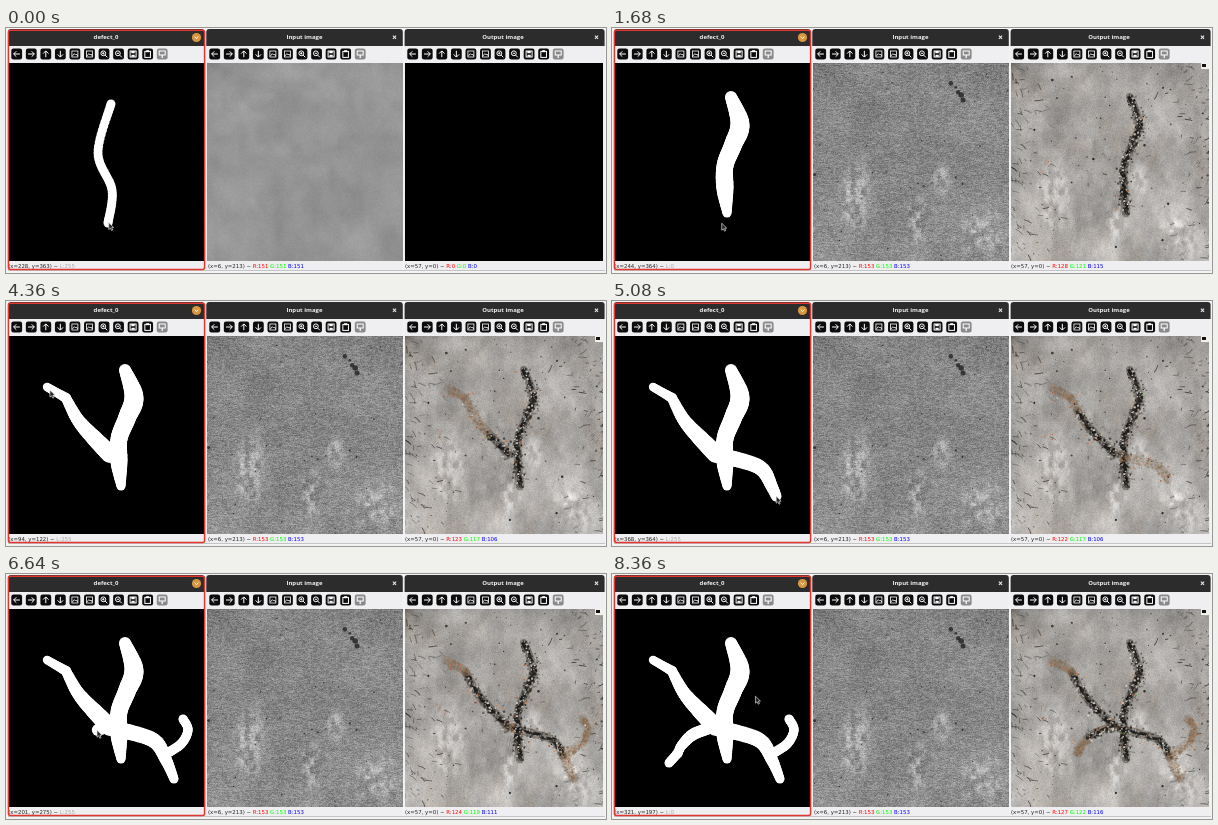
Recreate the animation shown at these times as an HTML page with a canvas. Size 600 by 245 pixels, loop 8.64 s.

```html
<!DOCTYPE html>
<html lang="en">
<head>
<meta charset="utf-8">
<title>Defect painting</title>
<style>
html, body { margin: 0; width: 100%; height: 100%; overflow: hidden; background: #f4f4f4; }
canvas { display: block; width: 600px; height: 245px; }
</style>
</head>
<body>
<canvas id="stage" width="600" height="245"></canvas>
<script>
const LOOP = 8640, SIZE = 198, TOP = 35, SCALE = 0.4375;
const SWITCH = 480, SETTLED = 8080, TAU = Math.PI * 2;
const ctx = document.getElementById('stage').getContext('2d');
const clamp = (v, a = 0, b = 1) => Math.max(a, Math.min(b, v));
const ramp = (t, a, b) => clamp((t - a) / (b - a));

function rng(seed) {
  return () => {
    seed = (seed + 0x6d2b79f5) | 0;
    let v = Math.imul(seed ^ (seed >>> 15), 1 | seed);
    v = (v + Math.imul(v ^ (v >>> 7), 61 | v)) ^ v;
    return ((v ^ (v >>> 14)) >>> 0) / 4294967296;
  };
}

function layer(w, h) {
  const c = document.createElement('canvas');
  c.width = w;
  c.height = h;
  return c;
}

// piecewise linear value of [time, a, b...] rows
function track(rows, t) {
  let i = 0;
  while (i < rows.length - 2 && rows[i + 1][0] <= t) i++;
  const a = rows[i], b = rows[i + 1], k = ramp(t, a[0], b[0]);
  return a.slice(1).map((v, j) => v + (b[j + 1] - v) * k);
}

// Catmull-Rom curve through [x, y, radius] points
function curve(p, per = 14) {
  const out = [], at = i => p[clamp(i, 0, p.length - 1)];
  for (let i = 0; i < p.length - 1; i++) {
    const [a, b, c, d] = [at(i - 1), at(i), at(i + 1), at(i + 2)];
    for (let s = 0; s < per; s++) {
      const u = s / per;
      out.push(b.map((v, k) => v + 0.5 * u * (c[k] - a[k] +
        u * (2 * a[k] - 5 * v + 4 * c[k] - d[k] + u * (3 * (v - c[k]) + d[k] - a[k])))));
    }
  }
  out.push(p[p.length - 1]);
  return out;
}

function disc(g, x, y, r) {
  g.beginPath();
  g.arc(x, y, r, 0, TAU);
  g.fill();
}

// ---- brush strokes and pointer ----
const trial = curve([[105, 76, 4.5], [92, 125, 4.5], [106, 162, 4.5], [102, 195, 4.5]]);
const trunk = curve([[119, 69, 6], [128, 96, 9.5], [121, 117, 9], [113, 138, 8.5], [113, 161, 8.5], [115, 185, 4.5]]);
const leftArm = curve([[104, 153, 9], [88, 137, 8], [72, 119, 6.5], [60, 97, 5]]);
const leftTip = curve([[60, 97, 5], [41, 86, 4.2]]);
const rightLeg = curve([[110, 155, 8], [147, 166, 7.5], [160, 186, 6], [168, 205, 4.5]]);
const hook = curve([[158, 181, 5], [175, 170, 4.8], [182, 156, 4.6], [177, 145, 4.5]]);
const leftLeg = curve([[104, 152, 6], [82, 160, 6], [70, 171, 5], [66, 179, 4.5]]);
const foot = curve([[66, 179, 4.8], [57, 189, 4.5]]);

// settle: share of the crack that turns dark; lag: how late it follows the brush
const stroke = (t0, t1, pts, { wide = 1, settle, lag = 1000 } = {}) => ({ t0, t1, pts, wide, settle, lag });
const firstStroke = stroke(-1, 0, trial);
const strokes = [
  stroke(980, 1500, trunk, { settle: 1, lag: 150 }),
  stroke(2440, 3240, leftArm, { wide: 0.75, settle: 0.95, lag: 2200 }),
  stroke(3480, 3900, leftArm),
  stroke(3940, 4280, leftTip, { settle: 0 }),
  stroke(4660, 5180, rightLeg, { settle: 0.62, lag: 1500 }),
  stroke(5420, 5820, hook, { settle: 0 }),
  stroke(6500, 7200, leftLeg, { settle: 0.5 }),
  stroke(7460, 7800, foot)
];

// where the pointer rests, in image pixels
const pointer = [
  [0, 228, 363], [920, 285, -62], [1680, 244, 364], [3440, 161, 190], [4360, 93, 121],
  [5880, 392, 248], [7360, 167, 295], [8160, 408, 115], [8360, 321, 197]
].map(([t, x, y]) => [t, 3 + x * SCALE, 36 + y * SCALE]);
for (const s of strokes) {
  s.pts.forEach(([x, y], i) => pointer.push([s.t0 + (s.t1 - s.t0) * i / (s.pts.length - 1), x, y]));
}
pointer.sort((a, b) => a[0] - b[0]);

const mask = layer(200, 245);
const mg = mask.getContext('2d', { willReadFrequently: true });

function drawMask(t) {
  mg.fillStyle = '#000';
  mg.fillRect(0, 0, 200, 245);
  mg.fillStyle = '#fff';
  for (const s of t < SWITCH ? [firstStroke] : strokes) {
    if (t <= s.t0) continue;
    const n = ramp(t, s.t0, s.t1) * (s.pts.length - 1);
    for (let i = 0; i <= n; i++) disc(mg, s.pts[i][0], s.pts[i][1], s.pts[i][2] * s.wide);
  }
}

// ---- concrete textures ----
function valueNoise(seed) {
  const r = rng(seed), grid = Array.from({ length: 4096 }, r);
  const at = (x, y) => grid[(x & 63) + ((y & 63) << 6)];
  const ease = u => u * u * (3 - 2 * u);
  return (x, y) => {
    const i = Math.floor(x), j = Math.floor(y), u = ease(x - i), v = ease(y - j);
    const a = at(i, j) + (at(i + 1, j) - at(i, j)) * u;
    const b = at(i, j + 1) + (at(i + 1, j + 1) - at(i, j + 1)) * u;
    return a + (b - a) * v - 0.5;
  };
}
const noise = valueNoise(7);
const fbm = (x, y) => noise(x, y) + noise(x * 2.1, y * 2.1) * 0.5 + noise(x * 4.3, y * 4.3) * 0.3;

function texture(seed, shade) {
  const c = layer(SIZE, SIZE), g = c.getContext('2d'), img = g.createImageData(SIZE, SIZE), r = rng(seed);
  for (let y = 0, i = 0; y < SIZE; y++) {
    for (let x = 0; x < SIZE; x++, i += 4) {
      const [v, warm] = shade(x, y, r);
      img.data.set([v + warm, v, v - warm, 255], i);
    }
  }
  g.putImageData(img, 0, 0);
  return c;
}

// pale worn spots: centre and radii
const worn = [[42, 135, 22, 48], [128, 115, 11, 20], [104, 155, 14, 34], [168, 172, 30, 34]];
function wear(x, y) {
  const near = Math.max(...worn.map(([a, b, p, q]) => 1 - Math.hypot((x - a) / p, (y - b) / q)));
  return clamp(near * 1.6) * clamp(0.5 + fbm(x / 5, y / 8) * 1.8);
}

function dots(g, seed, n) {
  const r = rng(seed);
  for (let i = 0; i < n; i++) {
    g.fillStyle = `rgba(25,25,25,${0.4 + r() * 0.5})`;
    disc(g, r() * SIZE, r() * SIZE, 0.4 + r() * r() * 1.2);
  }
}

const plain = texture(3, (x, y, r) =>
  [149 + fbm(x / 38, y / 45) * 16 + fbm(x / 9, y / 11) * 6 + (r() - 0.5) * 7, 0]);

const rough = texture(5, (x, y, r) => {
  const grain = noise(x / 2.6, y * 1.1) * 36 + (r() - 0.5) * 34;
  return [130 + y * 0.05 + fbm(x / 26, y / 50) * 18 + grain + wear(x, y) * 46, 0];
});
{
  const g = rough.getContext('2d'), r = rng(12);
  dots(g, 11, 80);
  g.fillStyle = 'rgba(40,40,40,.85)';
  for (let i = 0; i < 5; i++) disc(g, 137 + i * 3 + r() * 3, 20 + i * 4 + r() * 2, 1.3 + r() * 1.6);
}

const wall = texture(8, (x, y, r) => {
  const rust = clamp(fbm(x / 24 + 9, y / 28) - 0.1) * 9;
  return [154 + y * 0.1 + fbm(x / 24, y / 48) * 40 + fbm(x / 6, y / 8) * 16 + (r() - 0.5) * 18 +
    wear(x, y) * 42, 2.5 + rust];
});
{
  const g = wall.getContext('2d'), r = rng(31);
  dots(g, 23, 100);
  // dark fibres, mostly along both sides
  for (let i = 0; i < 150; i++) {
    const edge = r() * r() * 45, pick = r();
    const x = pick < 0.42 ? edge : pick < 0.85 ? SIZE - edge : r() * SIZE, y = r() * SIZE;
    const a = (x < SIZE / 2 ? 0.6 : -0.5) + (r() - 0.5) * 1.8, l = 2 + r() * 7;
    g.strokeStyle = `rgba(25,22,20,${0.3 + r() * 0.45})`;
    g.lineWidth = 0.5 + r() * 0.6;
    g.beginPath();
    g.moveTo(x, y);
    g.quadraticCurveTo(x + Math.cos(a) * l * 0.6, y + Math.sin(a) * l * 0.3, x + Math.cos(a) * l, y + Math.sin(a) * l);
    g.stroke();
  }
  // grey smear below the trunk
  for (let i = 0; i < 40; i++) {
    const x = 103 + r() * 14, y = 124 + r() * 12;
    g.strokeStyle = `rgba(60,57,54,${0.1 + r() * 0.2})`;
    g.beginPath();
    g.moveTo(x, y);
    g.lineTo(x - 3, y + 10 + r() * 10);
    g.stroke();
  }
  g.fillStyle = '#f2f2ec';
  g.fillRect(190, 0, 8, 6);
  g.fillStyle = '#111';
  g.fillRect(191, 1, 4, 3);
}

// ---- cracks follow the brush strokes ----
function crack(s, k) {
  const r = rng(41 + k), bits = [], n = s.pts.length * 6;
  const pts = s.pts.map(([x, y, w]) => [x + 399, y, w]);
  for (let i = 0; i < n; i++) {
    const u = i / n, [x, y, w] = pts[Math.floor(u * pts.length)];
    const spread = () => (r() + r() - 1) * w;
    bits.push({ u, x: x + spread(), y: y + spread(), s: 0.7 + r() * 1.5, kind: r(), tone: r() });
  }
  const line = pts.map(([x, y, w]) => [x + (r() - 0.5) * w * 0.5, y + (r() - 0.5) * w * 0.4]);
  return { ...s, pts, line, bits };
}
const cracks = strokes.filter(s => s.settle !== undefined).map(crack);
const stainAt = (c, t) => ramp(t, c.t0 + 100, c.t1 + 160);
const darkAt = (c, t) => c.settle * ramp(t, c.t0 + c.lag / 2, c.t1 + c.lag);

function trail(pts, part, color, width) {
  if (part <= 0) return;
  ctx.strokeStyle = color;
  ctx.lineWidth = width;
  ctx.beginPath();
  pts.slice(0, Math.ceil(part * pts.length)).forEach(p => ctx.lineTo(p[0], p[1]));
  ctx.stroke();
}

function drawCrack(c, t) {
  const stain = stainAt(c, t), dark = darkAt(c, t);
  trail(c.pts, stain, 'rgba(115,90,65,.2)', 9);
  trail(c.pts, dark, 'rgba(40,37,35,.3)', 8);
  trail(c.line, dark, 'rgba(15,15,15,.8)', 2.8);
  for (const b of c.bits) {
    if (b.u > stain) break;
    const v = b.tone * 50 | 0;
    if (b.u > dark || b.kind > 0.9) ctx.fillStyle = `rgba(${115 + v},${86 + v},${58 + v},.45)`;
    else if (b.kind < 0.4) ctx.fillStyle = `rgba(20,20,20,${0.4 + b.tone * 0.5})`;
    else if (b.kind < 0.6) ctx.fillStyle = `rgb(${160 + v},${158 + v},${152 + v})`;
    else ctx.fillStyle = 'rgba(70,66,62,.5)';
    ctx.fillRect(b.x, b.y, b.s, b.s);
  }
}

// stray coloured pixels, renewed at every generation step
function drawStray(t) {
  const r = rng(900 + Math.floor(t / 240));
  const hues = ['#d0713a', '#b0502a', '#c08a58', '#e8e4dc', '#5f9a4a', '#222'];
  for (const c of cracks) {
    const stain = stainAt(c, t);
    for (let i = 0; i < stain * 12; i++) {
      const p = c.pts[Math.floor(r() * stain * (c.pts.length - 1))];
      ctx.fillStyle = hues[Math.floor(r() * r() * hues.length)];
      const s = 0.7 + r() * 0.9;
      ctx.fillRect(p[0] + (r() - 0.5) * 22, p[1] + (r() - 0.5) * 16, s, s);
    }
  }
  for (let i = 0; i < 9; i++) {
    ctx.fillStyle = hues[i % 3];
    ctx.fillRect(428 + r() * 12, 128 + r() * 18, 1, 1);
  }
}

function drawOutput(t) {
  ctx.save();
  ctx.beginPath();
  ctx.rect(399, TOP, SIZE, SIZE);
  ctx.clip();
  ctx.lineCap = ctx.lineJoin = 'round';
  if (t < SWITCH) {
    ctx.fillStyle = '#000';
    ctx.fillRect(399, TOP, SIZE, SIZE);
  } else {
    const hold = Math.min(t, SETTLED);
    ctx.drawImage(wall, 399, TOP);
    cracks.forEach(c => drawCrack(c, hold));
    drawStray(hold);
  }
  ctx.restore();
}

// ---- window chrome ----
function lines(g, ...paths) {
  g.beginPath();
  for (const p of paths) p.forEach(([x, y], i) => i ? g.lineTo(x, y) : g.moveTo(x, y));
  g.stroke();
}

function icon(g, i, cx, cy) {
  g.save();
  g.translate(cx, cy);
  g.fillStyle = i === 10 ? '#8a8a8a' : '#0c0c0c';
  g.beginPath();
  g.roundRect(-5.4, -5.4, 10.8, 10.8, 2.2);
  g.fill();
  g.strokeStyle = g.fillStyle = '#fff';
  g.lineWidth = 1;
  if (i < 4) {
    g.rotate([Math.PI, 0, -Math.PI / 2, Math.PI / 2][i]);
    lines(g, [[-3.2, 0], [3, 0]], [[0.4, -2.7], [3.1, 0], [0.4, 2.7]]);
  } else if (i < 6) {
    g.lineWidth = 0.8;
    g.strokeRect(-3, -3, 6, 6);
    lines(g, [[-2.5, 2], [-0.6, -0.4], [0.7, 1], [1.6, 0], [2.8, 2]]);
  } else if (i < 8) {
    g.beginPath();
    g.arc(-0.7, -0.7, 2.4, 0, TAU);
    g.stroke();
    lines(g, [[1.1, 1.1], [3.3, 3.3]], [[-1.8, -0.7], [0.4, -0.7]]);
    if (i === 6) lines(g, [[-0.7, -1.8], [-0.7, 0.4]]);
  } else if (i === 8) {
    g.strokeRect(-3, -3, 6, 6);
    g.fillRect(-1.8, -3, 3.4, 2.2);
    g.fillRect(-1.6, 0.8, 3.2, 2);
  } else if (i === 9) {
    g.strokeRect(-2.8, -2.6, 5.6, 6);
    g.fillRect(-1.5, -3.8, 3, 2);
  } else {
    g.strokeRect(-3, -3, 6, 4);
    g.fillRect(-0.6, 1, 1.2, 3);
  }
  g.restore();
}

const chrome = layer(600, 245);
{
  const g = chrome.getContext('2d');
  g.fillStyle = '#f4f4f4';
  g.fillRect(0, 0, 600, 245);
  g.fillStyle = '#c4c4c4';
  g.fillRect(2, 242, 597, 1);
  ['defect_0', 'Input image', 'Output image'].forEach((name, k) => {
    const x = 2 + k * 198.3, w = k < 2 ? 196.5 : 200;
    g.fillStyle = '#efeef0';
    g.fillRect(x, 18, w, 224);
    g.fillStyle = '#2c2c2c';
    g.beginPath();
    g.roundRect(x, 1, w, 17, [3, 3, 0, 0]);
    g.fill();
    g.fillStyle = '#f2f2f2';
    g.font = '700 6px "Open Sans", "Noto Sans", sans-serif';
    g.textAlign = 'center';
    g.fillText(name, 100 + k * 198.5, 11.4);
    for (let i = 0; i < 11; i++) icon(g, i, 10.7 + k * 198 + i * 14.55, 26);
    g.strokeStyle = '#e8e8e8';
    g.lineWidth = 1.1;
    const cx = k === 1 ? 388.5 : 590.5;
    if (k) lines(g, [[cx - 1.6, 7.6], [cx + 1.6, 10.8]], [[cx + 1.6, 7.6], [cx - 1.6, 10.8]]);
  });
  g.fillStyle = '#d9963f';
  disc(g, 190.5, 9.5, 4.6);
  g.strokeStyle = '#fff';
  g.lineWidth = 0.9;
  lines(g, [[188.7, 8.6], [190.5, 10.6], [192.3, 8.6]]);
}

function status(x, parts) {
  ctx.font = '5.4px "DejaVu Sans", sans-serif';
  for (const [text, color] of parts) {
    ctx.fillStyle = color;
    ctx.fillText(text, x, 239.9);
    x += ctx.measureText(text).width;
  }
}
const rgbParts = (pos, [r, g, b]) =>
  [[pos + ' ~ ', '#222'], [`R:${r} `, '#f00'], [`G:${g} `, '#0f0'], [`B:${b}`, '#00f']];

function drawPointer(x, y) {
  ctx.beginPath();
  [[0, 0], [0, 7], [1.6, 5.6], [2.8, 8], [4, 7.4], [2.9, 5.1], [5, 4.9]].forEach(p => ctx.lineTo(x + p[0], y + p[1]));
  ctx.closePath();
  ctx.fillStyle = '#222';
  ctx.fill();
  ctx.strokeStyle = '#ddd';
  ctx.lineWidth = 0.7;
  ctx.stroke();
}

const readings = [[1680, 128, 121, 115], [3440, 125, 118, 106], [5880, 121, 116, 106],
  [7360, 127, 121, 115], [SETTLED, 127, 122, 116]];

function draw(t) {
  const early = t < SWITCH;
  const [px, py] = track(pointer, t);
  drawMask(t);
  ctx.drawImage(chrome, 0, 0);
  ctx.drawImage(mask, 3, TOP, 195, SIZE, 3, TOP, 195, SIZE);
  ctx.drawImage(early ? plain : rough, 0, 0, 196, SIZE, 201, TOP, 196, SIZE);
  drawOutput(t);
  const level = mg.getImageData(Math.round(px), Math.round(py), 1, 1).data[0] > 127 ? 255 : 0;
  const ix = Math.round((px - 3) / SCALE), iy = Math.max(0, Math.round((py - 36) / SCALE));
  status(2.2, [[`(x=${ix}, y=${iy}) ~ `, '#222'], [`L:${level}`, '#aaa']]);
  const gray = early ? 151 : 153;
  status(202, rgbParts('(x=6, y=213)', [gray, gray, gray]));
  status(399, rgbParts('(x=57, y=0)', early ? [0, 0, 0] : track(readings, t).map(Math.round)));
  ctx.strokeStyle = '#e0362f';
  ctx.lineWidth = 1.5;
  ctx.beginPath();
  ctx.roundRect(2.4, 2.3, 196.2, 239.2, 2);
  ctx.stroke();
  drawPointer(px, py);
}

const start = performance.now();
function tick() {
  draw((performance.now() - start) % LOOP);
  requestAnimationFrame(tick);
}
tick();
</script>
</body>
</html>
```
